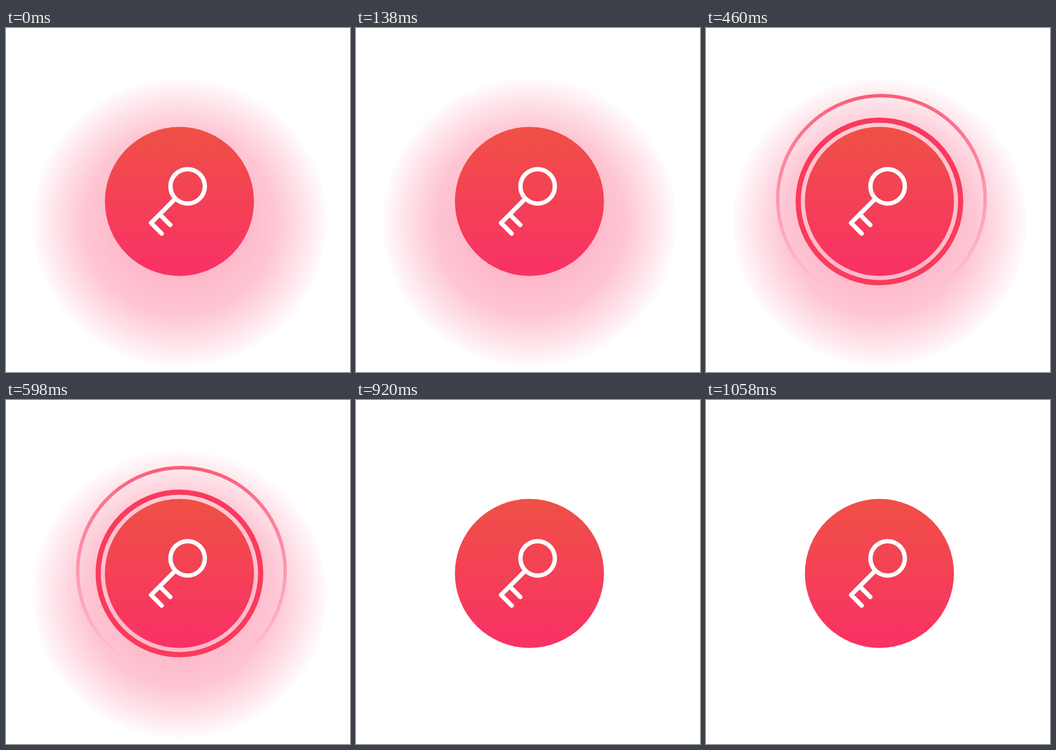
Recreate the animation shown at these times as an HTML page. Size 600x600 px, loop 1150 ms.

```html
<!DOCTYPE html>
<html lang="en">
<head>
<meta charset="utf-8">
<title>Pulsing key</title>
<style>
  html, body { margin: 0; width: 100%; height: 100%; overflow: hidden; background: #fff; }
  svg { display: block; width: 100%; height: 100%; }
</style>
</head>
<body>
<svg viewBox="0 0 600 600" fill="none">
  <defs>
    <linearGradient id="disc" x2="0" y2="1">
      <stop stop-color="#ef5045"/>
      <stop offset="1" stop-color="#f93166"/>
    </linearGradient>
    <linearGradient id="fadeDown" x2="0" y2="1">
      <stop stop-color="#fb3a5c" stop-opacity=".8"/>
      <stop offset=".92" stop-color="#fb3a5c" stop-opacity="0"/>
    </linearGradient>
    <linearGradient id="fadeUp" x2="0" y2="1">
      <stop stop-color="#fb3a5c" stop-opacity="0"/>
      <stop offset="1" stop-color="#fb3a5c" stop-opacity=".7"/>
    </linearGradient>
    <radialGradient id="halo">
      <stop offset=".4" stop-color="#fb3a6a" stop-opacity=".36"/>
      <stop offset=".65" stop-color="#fb3a6a" stop-opacity=".29"/>
      <stop offset=".85" stop-color="#fb3a6a" stop-opacity=".14"/>
      <stop offset="1" stop-color="#fb3a6a" stop-opacity=".02"/>
    </radialGradient>
  </defs>

  <ellipse id="glow" cx="303" cy="339" rx="256" ry="250" fill="url(#halo)"/>
  <circle class="ring" cx="302.5" cy="302.5" r="141.7" stroke="#fb3a5c" stroke-width="9"/>
  <circle class="ring" cx="306" cy="299" r="181" stroke="url(#fadeDown)" stroke-width="6"/>
  <circle class="ring" cx="303.5" cy="303" r="232.5" stroke="url(#fadeUp)" stroke-width="5"/>
  <circle cx="302.5" cy="302.5" r="130" fill="url(#disc)"/>

  <g stroke="#fff" stroke-width="7.6" stroke-linecap="round" stroke-linejoin="round">
    <circle cx="316.8" cy="276.2" r="30"/>
    <path d="M294.5 298.5 253 340l18.5 18.5M268.5 325.5l18 18"/>
  </g>
</svg>
<script>
  const STEP = 230, STEPS = 5;
  const glow = document.getElementById('glow');
  const rings = document.querySelectorAll('.ring');
  const show = (el, on) => el.setAttribute('visibility', on ? 'visible' : 'hidden');

  // One more ring per step; the last step leaves the bare disc.
  function draw(now) {
    const step = Math.floor(now / STEP) % STEPS;
    const lit = step < STEPS - 1;
    show(glow, lit);
    rings.forEach((ring, i) => show(ring, lit && step > i));
  }

  const start = performance.now();
  function tick() {
    draw(performance.now() - start);
    requestAnimationFrame(tick);
  }
  tick();
</script>
</body>
</html>
```
